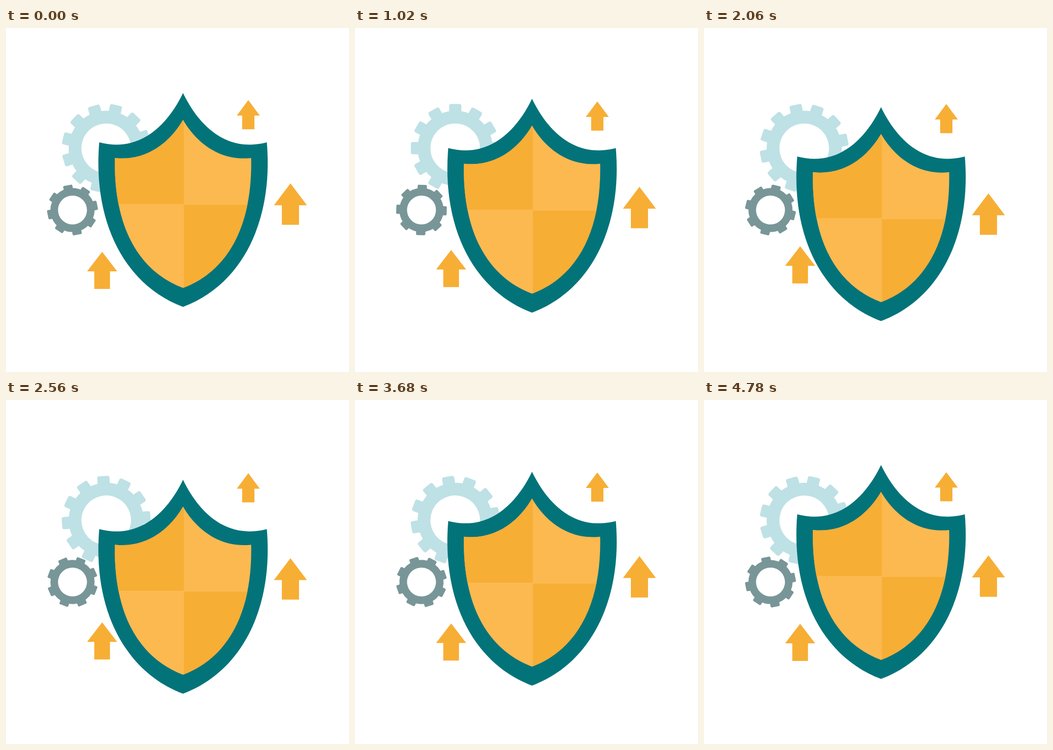
An HTML page for the animation above (4.8 s loop, 700x704 px).

```html
<!DOCTYPE html>
<html>
<head>
<meta charset="utf-8">
<style>
  html, body { margin: 0; width: 100%; height: 100%; overflow: hidden; background: #fff; }
  svg { display: block; width: 100%; height: 100%; }
</style>
</head>
<body>
<svg viewBox="0 0 700 704">
  <defs>
    <clipPath id="face">
      <path d="M361.3 188C389.3 236 437.3 273 500.3 266C503.3 395 459.3 495 361.3 532C263.3 495 219.3 395 222.3 266C285.3 273 333.3 236 361.3 188Z"/>
    </clipPath>
  </defs>
  <g id="gears"></g>
  <g id="shield">
    <path fill="#03737a" d="M361.3 133C392.3 197.5 448.3 256 532.3 234C546.3 400 478.3 527 361.3 570.8C244.3 527 176.3 400 190.3 234C274.3 256 330.3 197.5 361.3 133Z"/>
    <g clip-path="url(#face)">
      <path fill="#fcb950" d="M200 180H520V540H200Z"/>
      <path fill="#f7ae35" d="M200 180H363V360H200ZM363 362H520V540H363Z"/>
    </g>
  </g>
  <g id="arrows" fill="#f7ae35"></g>
</svg>
<script>
const LOOP = 4800, STEP = 20;
const byId = id => document.getElementById(id);

function add(parent, tag, attrs) {
  const node = document.createElementNS('http://www.w3.org/2000/svg', tag);
  for (const name in attrs) node.setAttribute(name, attrs[name]);
  return parent.appendChild(node);
}

function makeGear({ x, y, hole, body, outer, teeth, tooth, round, color, start, turn }) {
  const place = add(byId('gears'), 'g', { transform: `translate(${x} ${y})` });
  const wheel = add(place, 'g', { fill: color });
  add(wheel, 'circle', { r: (hole + body) / 2, fill: 'none', stroke: color, 'stroke-width': body - hole });
  for (let i = 0; i < teeth; i++) {
    add(wheel, 'rect', {
      x: -tooth / 2, y: -outer, width: tooth, height: outer - body + 8, rx: round,
      transform: `rotate(${i * 360 / teeth})`
    });
  }
  return { wheel, start, turn };
}

function makeArrow({ x, top, neck, bottom, head, stem, travel }) {
  const d = `M${x} ${top}L${x + head} ${neck}H${x + stem}V${bottom}H${x - stem}V${neck}H${x - head}Z`;
  return { node: add(byId('arrows'), 'path', { d }), travel };
}

const gears = [
  { x: 204.5, y: 246, hole: 50.5, body: 76.5, outer: 90.5, teeth: 12, tooth: 25, round: 4, color: '#bee1e5', start: 13.2, turn: 360 },
  { x: 135.7, y: 372.5, hole: 29.5, body: 45, outer: 51.5, teeth: 8, tooth: 19, round: 2.5, color: '#789698', start: -11.2, turn: -360 }
].map(makeGear);

const arrows = [
  { x: 494.5, top: 147.6, neck: 179.3, bottom: 207.3, head: 23.5, stem: 12.5, travel: 13.3 },
  { x: 580.5, top: 318, neck: 362.8, bottom: 402.7, head: 33.7, stem: 17.5, travel: 34 },
  { x: 196.2, top: 458, neck: 498, bottom: 534, head: 30.7, stem: 16, travel: -18.5 }
].map(makeArrow);

// Smooth 0 -> 1 -> 0 over one cycle
const sway = cycle => (1 - Math.cos(cycle * 2 * Math.PI)) / 2;
const shift = (node, y) => node.setAttribute('transform', `translate(0 ${y})`);

function draw(now) {
  const t = now % LOOP;
  const spin = Math.min(t / (LOOP - STEP), 1);
  for (const g of gears) g.wheel.setAttribute('transform', `rotate(${g.start + g.turn * spin})`);
  shift(byId('shield'), 30.5 * sway(t / LOOP));
  for (const a of arrows) shift(a.node, a.travel * sway(4 * t / LOOP));
  requestAnimationFrame(draw);
}
draw(0);
</script>
</body>
</html>
```
